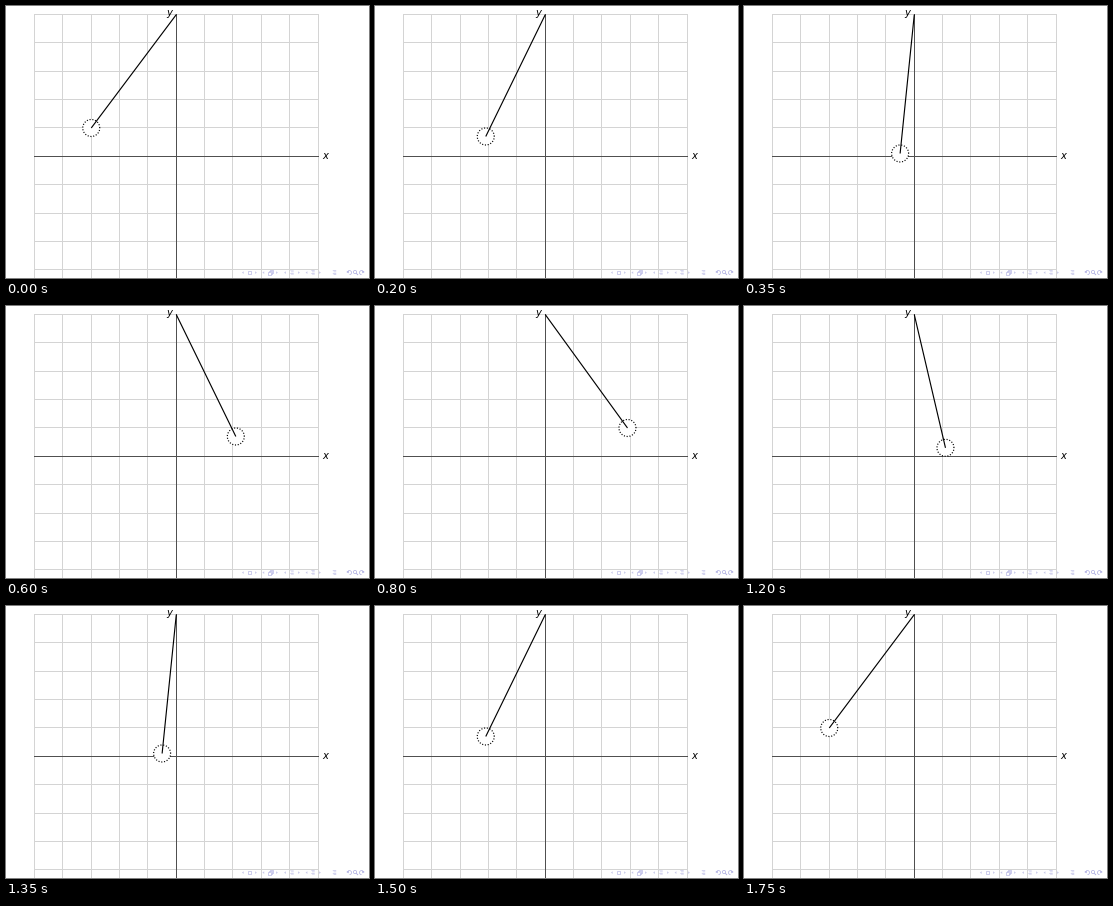
Animation of 363 by 272 pixels, one loop 1.8 s. Source, as a matplotlib script:

```python
import numpy as np
import matplotlib.pyplot as plt
from matplotlib.animation import FuncAnimation
from matplotlib.patches import Arc, Circle, Polygon, Rectangle

W, H, DPI = 363, 272, 72          # at 72 dpi one point is one pixel
CM = 28.346
OX, OY = 170.29, 150.33           # origin of the coordinate system
R = 0.3 * CM
FRAMES, HALF = 36, 18
GRID, AXIS = "#d4d4d4", "#505050"
NAV, NAV_DIM = "#adade1", "#c9c9ea"

fig = plt.figure(figsize=(W / DPI, H / DPI), dpi=DPI, facecolor="white")
ax = fig.add_axes([0, 0, 1, 1])
ax.set(xlim=(0, W), ylim=(H, 0))
ax.axis("off")


def px(x, y):
    return OX + CM * x, OY - CM * y


def line(xs, ys, color, lw, **kw):
    kw = {"solid_capstyle": "butt", "snap": False, **kw}
    return ax.plot(xs, ys, color=color, lw=lw, **kw)[0]


def cell(v):
    """Centre of the pixel that holds v."""
    return np.floor(v) + 0.5


def cross(i, color):
    """Vertical and horizontal hairline at grid position i."""
    x, y = (cell(v) for v in px(i, i))
    left, top = (np.floor(v) for v in px(-5, 5))
    right = np.floor(px(5, 0)[0]) + 1
    line([x, x], [top, H + 5], color, 1)
    line([left, right], [y, y], color, 1)


def draw_grid():
    for i in range(-5, 6):
        cross(i, GRID)
    cross(0, AXIS)
    for s, x, y in (("x", 316.2, 153), ("y", 160.3, 10)):
        ax.text(x, y, s, family="DejaVu Sans", style="italic", size=10)


def arrow(x, y, d, color=NAV_DIM):
    ax.add_patch(Polygon([(x - d, y), (x + d, y - 1.3), (x + d, y + 1.3)],
                         fc=color, ec="none"))


def bars(x, y, colors):
    for i, c in enumerate(colors):
        dx = 0.8 * (i % 2)
        yy = y + 1.4 * (i - 1.5)
        line([x - 1.7 + dx, x + 1.7], [yy, yy], c, 0.5)


def box(x, y, w, h):
    ax.add_patch(Rectangle((x, y), w, h, fc="white", ec=NAV, lw=0.6))


def draw_nav():
    y = 266.6
    for a, b in ((236.8, 250), (257.3, 271), (279, 293), (300.5, 314)):
        arrow(a, y, 0.9)
        arrow(b, y, -0.9)
    box(241.5, y - 1.2, 3.8, 2.6)
    for i in (2, 1, 0):
        box(261.9 + 0.8 * i, y - 0.8 - 0.8 * i, 3, 2.8)
    bars(286, y, [NAV_DIM, NAV, NAV, NAV_DIM])
    bars(307, y, [NAV, NAV, NAV, NAV_DIM])
    bars(328.5, y, [NAV] * 4)
    for x, d in ((343.5, 1), (355.5, -1)):
        a, b = (190, 90) if d > 0 else (90, -10)
        ax.add_patch(Arc((x, y), 4, 4, theta1=a, theta2=b, ec=NAV, lw=0.7))
        arrow(x - 2 * d, y - 0.6, 1.2 * d, NAV)
    ax.add_patch(Circle((349, y - 0.6), 1.6, fc="none", ec=NAV, lw=0.7))
    line([350.2, 352], [y + 0.6, y + 2.4], NAV, 0.9)


def bob(n):
    """Pendulum bob in grid units, cut to tenths; it lingers once per swing."""
    turn, j = divmod(n, HALF)
    k = j - (j > 14) - 8
    s = np.sin(np.pi * k / 16)
    side = 1 if turn % 2 == 0 else -1
    x = side * np.trunc(30 * s) / 10
    y = np.floor(10.2 * abs(s)) / 10
    return x, y


draw_grid()
draw_nav()
angle = np.linspace(0, 2 * np.pi, 181)
disc = ax.add_patch(Circle((0, 0), R, fc="white", ec="none", zorder=3))
ring = line([], [], "black", 1.2, ls=(0, (0.9, 1.43)),
            dash_capstyle="butt", zorder=4)
rod = line([], [], "black", 1.15, zorder=5)


def update(n):
    x, y = px(*bob(n))
    top = px(0, 5)
    disc.center = x, y
    ring.set_data(x + R * np.cos(angle), y - R * np.sin(angle))
    rod.set_data([top[0], x], [top[1], y])
    return disc, ring, rod


anim = FuncAnimation(fig, update, frames=FRAMES, interval=50,
                     repeat=True, repeat_delay=0, blit=False)
plt.show()
```
